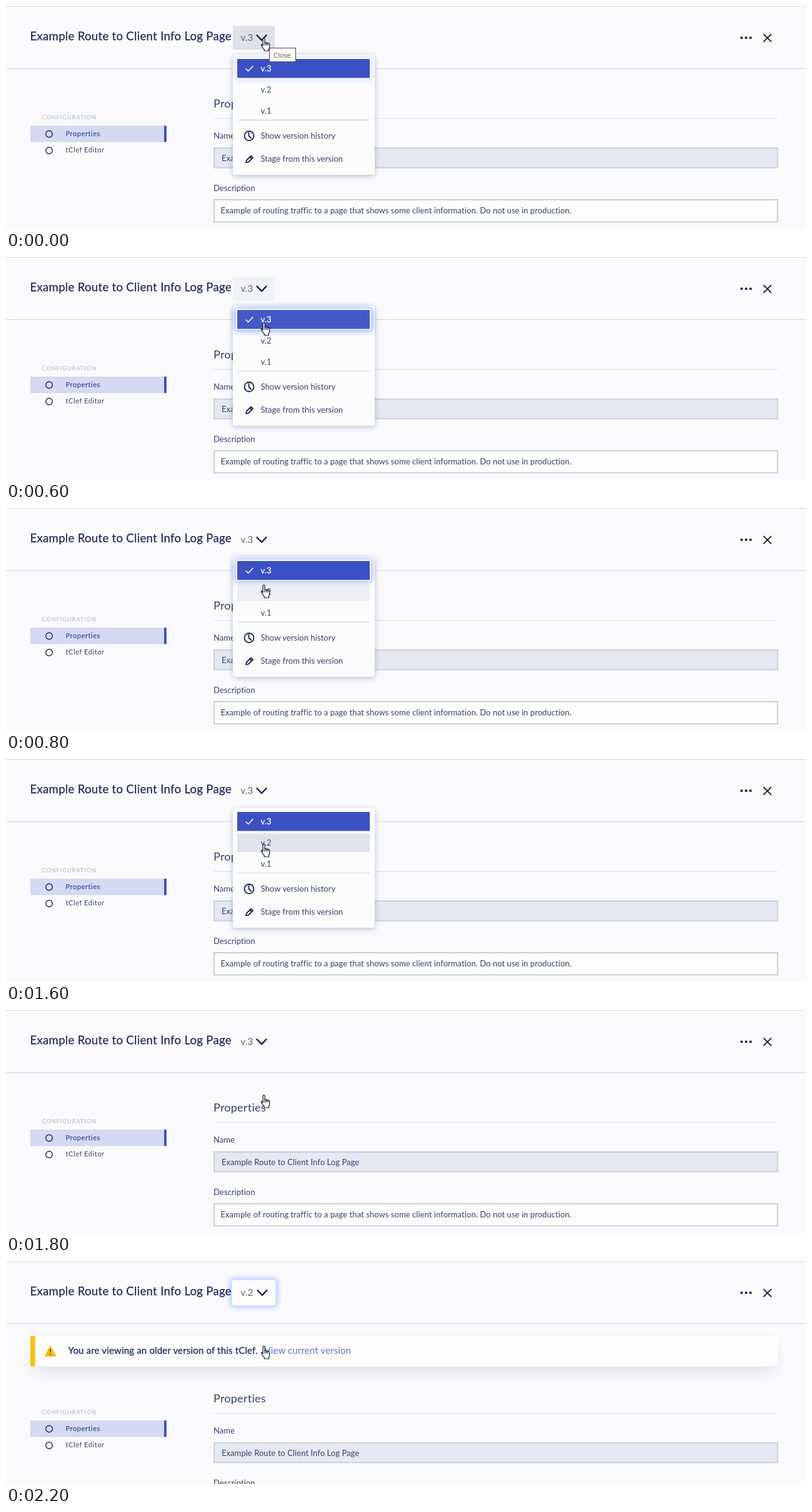
Write an HTML page that moves like this. It is 1280x358 px and loops after 2.4 s.

```html
<!DOCTYPE html>
<html lang="en">
<head>
<meta charset="utf-8">
<title>Version menu</title>
<style>
html, body { margin: 0; width: 100%; height: 100%; overflow: hidden; background: #fafafc; }
svg { display: block; width: 100%; height: 100%; }
text { font: 13px Lato, "Open Sans", sans-serif; letter-spacing: .06px; fill: #38416e; }
.title { font-size: 18.5px; letter-spacing: .33px; fill: #1f295a; stroke: #1f295a; stroke-width: .25px; }
.head { font-size: 18px; letter-spacing: .25px; }
.caps { font-size: 9px; letter-spacing: 1.05px; fill: #b3b6c5; }
.nav { font-size: 11px; letter-spacing: .58px; }
.nav.on { fill: #3a499f; stroke: #3a499f; stroke-width: .2px; }
.ver { font-size: 15px; fill: #5d6486; }
.pick { fill: #fff; stroke: #fff; stroke-width: .3px; }
.tip { font: 11px "Open Sans", sans-serif; letter-spacing: 0; fill: #575757; }
.note { font-size: 15px; letter-spacing: .17px; fill: #1f295a; stroke: #1f295a; stroke-width: .25px; }
.link { font-size: 15px; letter-spacing: .13px; fill: #5479d8; }
.line { fill: none; stroke: #17204f; stroke-width: 1.8; stroke-linecap: round; stroke-linejoin: round; }
.ring { fill: none; stroke: #1b2557; stroke-width: 1.4; }
.field { stroke: #cdd0d6; stroke-width: 2; }
</style>
</head>
<body>
<svg viewBox="0 0 1280 358" preserveAspectRatio="none">
  <defs>
    <filter id="soft" x="-20%" y="-60%" width="140%" height="220%"><feGaussianBlur stdDeviation="5"/></filter>
    <filter id="wide" x="-5%" y="-80%" width="110%" height="260%"><feGaussianBlur stdDeviation="12"/></filter>
  </defs>

  <rect width="1280" height="358" fill="#fafafc"/>
  <path d="M0 .5H1280M0 100.5H1280" stroke="#d9dadf"/>

  <g id="banner">
    <rect x="45" y="132" width="1184" height="46" fill="#2a3866" opacity=".13" filter="url(#wide)"/>
    <rect x="39" y="120.500" width="1196" height="48.500" fill="#fdfdfe"/>
    <rect x="39" y="120.500" width="7.500" height="48.500" fill="#fbbf05"/>
    <path d="M71 137L79 152.500H63Z" fill="#fbbf05" stroke="#fbbf05" stroke-width="2" stroke-linejoin="round"/>
    <path d="M71 141.500V147M71 149V151" stroke="#3a3520" stroke-width="1.700"/>
    <text class="note" x="99.500" y="149">You are viewing an older version of this tClef.</text>
    <text class="link" x="413.500" y="149">View current version</text>
  </g>

  <g id="page">
    <text class="caps" x="57.500" y="182">CONFIGURATION</text>
    <rect x="39" y="192" width="214" height="26.500" fill="#d3daf1"/>
    <rect x="253" y="192" width="3.800" height="26.500" fill="#3b50bb"/>
    <circle class="ring" cx="69" cy="205.500" r="5.300"/>
    <circle class="ring" cx="69" cy="232" r="5.300"/>
    <text class="nav on" x="95.500" y="208.500">Properties</text>
    <text class="nav" x="95.500" y="235">tClef Editor</text>
    <text class="head" x="332" y="163">Properties</text>
    <path d="M332 180.500H1235" stroke="#dfe0e5"/>
    <text x="332" y="213">Name</text>
    <rect class="field" x="333" y="228" width="901.500" height="31.500" fill="#e5e8f2"/>
    <text x="345" y="248.500">Example Route to Client Info Log Page</text>
    <text x="332" y="296.500">Description</text>
    <rect class="field" x="333" y="311" width="901.500" height="35.500" fill="#fdfdfe"/>
    <text x="343.500" y="332.500">Example of routing traffic to a page that shows some client information. Do not use in production.</text>
  </g>

  <rect id="button" x="363" y="32" width="67" height="38" rx="2"/>
  <g id="focus">
    <rect x="359" y="28" width="75" height="46" rx="5" fill="#7fa6ff" opacity=".65" filter="url(#soft)"/>
    <rect x="361" y="30" width="71" height="42" rx="4" fill="#fdfdff" stroke="#c3d5ff"/>
  </g>
  <text class="title" x="38.500" y="55">Example Route to Client Info Log Page</text>
  <text class="ver" id="version" x="375.500" y="56">v.3</text>
  <path id="chevron" class="line" d="M401.500 47L409 54.800L416.500 47" style="stroke-width:2.400"/>
  <g fill="#17204f"><circle cx="1177" cy="51" r="2.100"/><circle cx="1184.200" cy="51" r="2.100"/><circle cx="1191.300" cy="51" r="2.100"/></g>
  <path class="line" d="M1212.500 45.500L1224 57M1224 45.500L1212.500 57"/>

  <g id="menu">
    <rect x="363" y="81" width="227" height="192" rx="4" fill="#2a3866" opacity=".3" filter="url(#soft)"/>
    <rect x="363" y="78" width="227" height="193" rx="4" fill="#fcfcfd"/>
    <rect id="glow" x="366" y="82" width="220" height="37" rx="4" fill="#5b86ff" filter="url(#soft)"/>
    <rect id="halo" x="368" y="83" width="216" height="34" rx="3" fill="#fff"/>
    <rect id="first" x="370" y="85" width="212" height="30.500" rx="1"/>
    <rect id="second" x="370" y="119.500" width="212" height="30" fill="#e1e3eb"/>
    <path class="line" d="M384 101L387.500 104.500L395 96.500" style="stroke:#fff;stroke-width:1.600"/>
    <text class="pick" x="407.500" y="104.500">v.3</text>
    <text x="407.500" y="138.500">v.2</text>
    <text x="407.500" y="172.500">v.1</text>
    <path d="M370 183H582" stroke="#dfe0e5" stroke-width="1.300"/>
    <circle class="line" cx="389" cy="208.500" r="7.500"/>
    <path class="line" d="M388.500 203.500V208.500L392 212"/>
    <text x="407.500" y="212.500">Show version history</text>
    <path class="line" d="M384 251.500L385 247.500L392 240.500L395 243.500L388 250.500ZM390 242.500L393 245.500"/>
    <text x="407.500" y="250">Stage from this version</text>
  </g>

  <g id="tip">
    <rect x="421.500" y="67.500" width="42" height="22" fill="#fff" stroke="#4b4b4b"/>
    <text class="tip" x="428" y="82.500">Close</text>
  </g>

  <g id="cursor" stroke="#15182b" stroke-width="1.200" stroke-linejoin="round" stroke-linecap="round">
    <path fill="#fff" d="M3.500 13V2.200a1.500 1.500 0 0 1 3 0V8q1.300-.8 2.500.4q1.400-.6 2.400.6q2.300-.4 2.700 1.600v4q0 2-1.200 3.600v2.800H5.600v-2.300q-2.200-2-4.600-6.200q-.6-1.800.9-1.900q.8 0 1.600 2.400Z"/>
    <path fill="none" d="M6.500 8V12M9 8.600V12M11.400 9.200V12"/>
  </g>
</svg>
<script>
const LOOP = 2400;
const el = id => document.getElementById(id);
const show = (id, amount) => el(id).setAttribute("opacity", Number(amount));

const base = { tip: 0, button: "none", glow: 0, first: "#3b50c2", hover: 0, menu: 1, focus: 0, old: 0 };
const steps = [
  { at: 0, y: 51, tip: 1, button: "#dfe1ea", glow: .22 },
  { at: 200, y: 54, tip: 1, button: "#dfe1ea", glow: .3 },
  { at: 400, y: 71, button: "#dfe1ea", glow: .4 },
  { at: 600, y: 104.5, button: "#f1f2f6", glow: .7, first: "#4459c8" },
  { at: 800, y: 123, glow: .6, hover: .5 },
  { at: 1000, y: 136, glow: .5, hover: 1 },
  { at: 1600, y: 136, hover: 1 },
  { at: 1800, y: 136, menu: 0 },
  { at: 2000, y: 136, menu: 0, focus: 1 },
  { at: 2200, y: 136, menu: 0, focus: 1, old: 1 }
].map(step => ({ ...base, ...step }));

function draw(s) {
  el("cursor").setAttribute("transform", `translate(407.6 ${s.y})`);
  el("button").setAttribute("fill", s.button);
  el("first").setAttribute("fill", s.first);
  show("tip", s.tip);
  show("glow", s.glow);
  show("halo", s.glow > 0);
  show("second", s.hover);
  show("menu", s.menu);
  show("focus", s.focus);
  show("banner", s.old);
  el("page").setAttribute("transform", `translate(0 ${s.old * 64})`);
  el("chevron").setAttribute("transform", `translate(${s.old} 0)`);
  el("version").textContent = s.old ? "v.2" : "v.3";
}

const start = performance.now();
let current;
function tick() {
  const t = (performance.now() - start) % LOOP;
  const step = steps.findLast(s => s.at <= t);
  if (step !== current) draw(current = step);
  requestAnimationFrame(tick);
}
tick();
</script>
</body>
</html>
```
